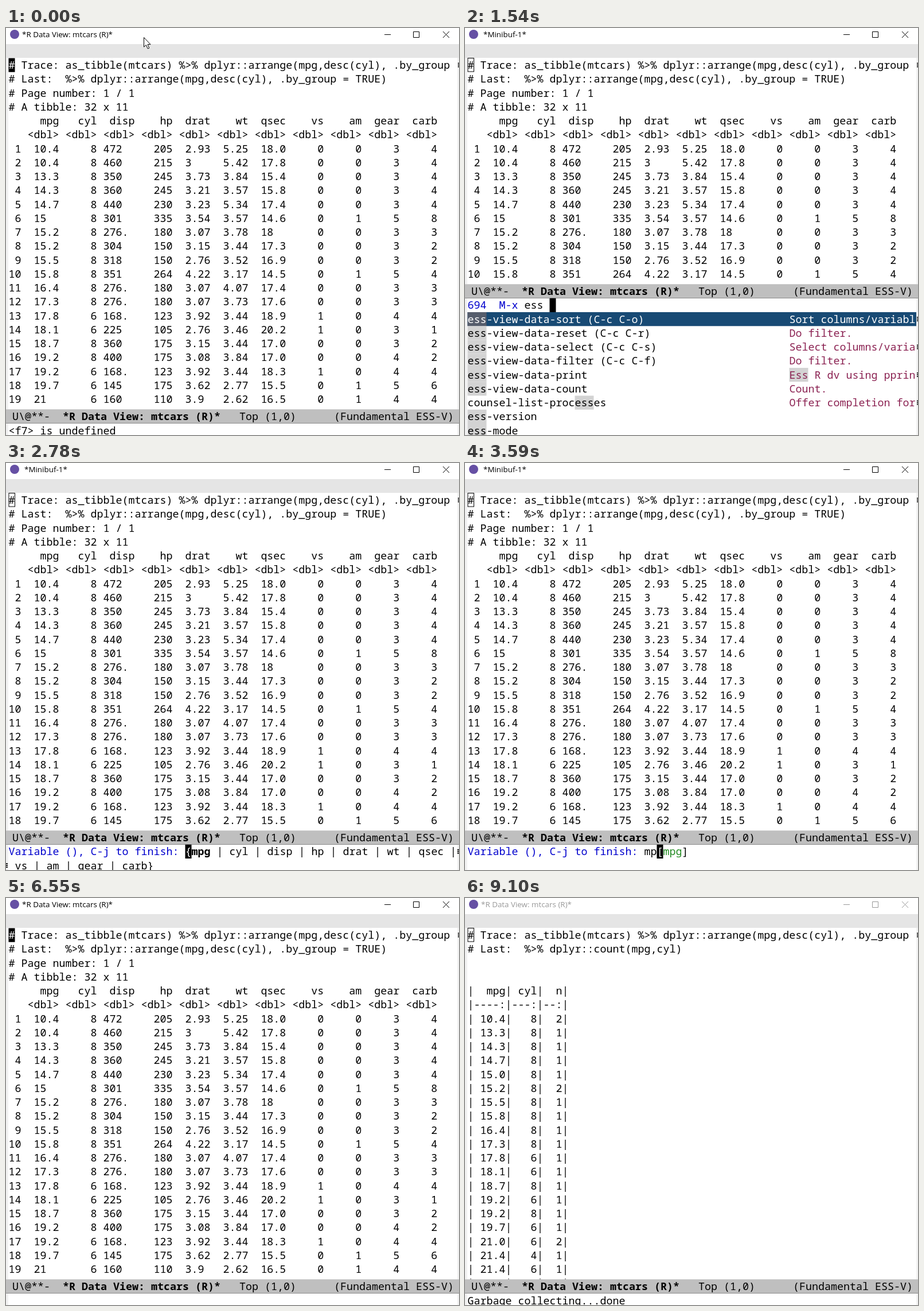
Write an HTML page that moves like this. It is 790 px wide and 709 px high and loops after 9.18 s.

```html
<!DOCTYPE html>
<html lang="en">
<head>
<meta charset="utf-8">
<title>Data view: count</title>
<style>
  html, body { margin: 0; width: 100%; height: 100%; overflow: hidden; background: #fff; }
  svg { display: block; width: 790px; height: 709px; }
  text { white-space: pre; font: 18.333px "Noto Sans Mono", "DejaVu Sans Mono", monospace; }
  text.b { font-weight: 700; }
  text.title { font: 13.4px "Open Sans", "Noto Sans", sans-serif; }
</style>
</head>
<body>
<svg id="stage" viewBox="0 0 790 709"></svg>
<script>
const LOOP = 9180;
const CW = 11, LH = 24.25, X0 = 4.5, COLS = 71;
const TOP = 64.5, BOTTOM = 701;      // centres of the first and last text lines
const BLUE = '#0000cd', GREEN = '#228b22', DOC = '#8b2252', BAR = '#184a74';

const FIELDS = ['mpg', 'cyl', 'disp', 'hp', 'drat', 'wt', 'qsec', 'vs', 'am', 'gear', 'carb'];
const TRACE = '# Trace: as_tibble(mtcars) %>% dplyr::arrange(mpg,desc(cyl), .by_group';

// One column of the table per line; one-digit columns need no spaces
const mpg = '10.4 10.4 13.3 14.3 14.7 15 15.2 15.2 15.5 15.8 16.4 17.3 17.8 18.1 18.7 19.2 19.2 19.7 21'.split(' ');
const disp = '472 460 350 360 440 301 276. 304 318 351 276. 276. 168. 225 360 400 168. 145 160'.split(' ');
const hp = '205 215 245 245 230 335 180 150 150 264 180 180 123 105 175 175 123 175 110'.split(' ');
const drat = '2.93 3 3.73 3.21 3.23 3.54 3.07 3.15 2.76 4.22 3.07 3.07 3.92 2.76 3.15 3.08 3.92 3.62 3.9'.split(' ');
const wt = '5.25 5.42 3.84 3.57 5.34 3.57 3.78 3.44 3.52 3.17 4.07 3.73 3.44 3.46 3.44 3.84 3.44 2.77 2.62'.split(' ');
const qsec = '18.0 17.8 15.4 15.8 17.4 14.6 18 17.3 16.9 14.5 17.4 17.6 18.9 20.2 17.0 17.0 18.3 15.5 16.5'.split(' ');
const cyl = '8'.repeat(12) + '6688666';
const gear = '3333353335334334' + '454';
const carb = '4444483224334122' + '464';
const vs = i => +[12, 13, 16].includes(i);
const am = i => +[5, 9, 17, 18].includes(i);

const heading = names => '  ' + names.map(n => n.padStart(6)).join('');
const tibbleRow = (m, i) => String(i + 1).padStart(2) +
  [m.padEnd(4), cyl[i], disp[i].padEnd(5), hp[i], drat[i].padEnd(4), wt[i], qsec[i].padEnd(4), vs(i), am(i), gear[i], carb[i]]
    .map(v => String(v).padStart(6)).join('');

const TIBBLE = [TRACE,
  '# Last:  %>% dplyr::arrange(mpg,desc(cyl), .by_group = TRUE)',
  '# Page number: 1 / 1', '# A tibble: 32 x 11',
  heading(FIELDS), heading(FIELDS.map(() => '<dbl>')),
  ...mpg.map(tibbleRow)];

// Counts each mpg and cyl pair, including the cars below the visible page
function countLines() {
  const below = ['21.0 6', '21.4 4', '21.4 6', '21.5 4'];
  const tally = {};
  for (const key of [...mpg.map((m, i) => `${(+m).toFixed(1)} ${cyl[i]}`), ...below]) {
    tally[key] = (tally[key] || 0) + 1;
  }
  return Object.keys(tally).sort().map(key => {
    const [m, c] = key.split(' ');
    return `| ${m}|   ${c}|  ${tally[key]}|`;
  });
}

const COUNT = [TRACE, '# Last:  %>% dplyr::count(mpg,cyl)', '', '',
  '|  mpg| cyl|  n|', '|----:|---:|--:|', ...countLines()];

// Completion candidates: name, description, whether it runs past the edge
const SORT = ['ess-view-data-sort (C-c C-o)', 'Sort columns/variabl', true];
const SELECT = ['ess-view-data-select (C-c C-s)', 'Select columns/varia', true];
const VIEW = [SORT,
  ['ess-view-data-reset (C-c C-r)', 'Do filter.'], SELECT,
  ['ess-view-data-filter (C-c C-f)', 'Do filter.'],
  ['ess-view-data-print', 'Ess R dv using pprin', true]];
const THEME = ['disable-theme', 'Disable all variable', true];
const FOX = ['my-app-firefox', 'Firfox'];
const TALLY = ['ess-view-data-count', 'Count.'];
const PROC = ['counsel-list-processes', 'Offer completion for', true];
const LIST_ALL = [...VIEW, ['R', ''], THEME, FOX, ['S', "Call 'Splus6', based", true]];
const LIST_E = [...VIEW, THEME, FOX, TALLY, PROC];
const LIST_ESS = [...VIEW, TALLY, PROC, ['ess-version', ''], ['ess-mode', '']];
const LIST_C = [SELECT, TALLY, PROC, SORT];
const LIST_CO = [TALLY, PROC];

const esc = s => s.replace(/&/g, '&amp;').replace(/</g, '&lt;');
const rect = (x, y, w, h, fill, extra = '') =>
  `<rect x="${x}" y="${y}" width="${w}" height="${h}" fill="${fill}" ${extra}/>`;
const text = (x, mid, s, fill = '#000', cls = '') =>
  `<text x="${x}" y="${mid + 6.5}" fill="${fill}" class="${cls}">${esc(s)}</text>`;
const cell = (col, mid, n, fill) => rect(X0 + col * CW, mid - 12, n * CW, LH, fill);
const at = (col, mid, s, fill, cls) => text(X0 + col * CW, mid, s, fill, cls);
const fromBottom = k => BOTTOM - k * LH;
const edgeMark = (x, mid) => [-4, -1, 2].map(d => rect(x, mid + d, 3, 2, '#222')).join('');

function pointer(x, y) {
  return `<path transform="translate(${x} ${y})" d="M.5 .5V17L4.3 13.5 7.2 20 9.8 19 7 12.6H12Z" fill="#fff" stroke="#000"/>`;
}

function titleBar(s) {
  const ink = s.blur ? '#999' : '#000';
  return rect(0, 0, 790, 28, '#fff') + rect(0, 28, 790, 24, '#e5e5e5') +
    '<circle cx="15" cy="11" r="8" fill="#6650a4"/>' +
    `<text class="title" x="${s.mini ? 32 : 28}" y="16" fill="${ink}">${s.mini ? '*Minibuf-1*' : '*R Data View: mtcars (R)*'}</text>` +
    `<path d="M660 11.5h11M710.5 6.5h10v10h-10zM762 6l11 11M773 6l-11 11" fill="none" stroke="${ink}"/>`;
}

function buffer(s) {
  const lines = s.count ? COUNT : TIBBLE;
  const hollow = s.mini || s.blur;
  let out = hollow ? rect(5, 52.5, 10.5, 23.5, 'none', 'stroke="#000"') : cell(0, TOP, 1, '#000');
  lines.forEach((line, i) => {
    const mid = TOP + i * LH;
    if (i || hollow) out += at(0, mid, line);
    else out += at(0, mid, '#', '#fff') + at(1, mid, line.slice(1));
  });
  return out;
}

function modeLine(k) {
  const mid = fromBottom(k), y = Math.round(mid - 12.5);
  return rect(0, y, 790, 709 - y, '#fff') + rect(0, y, 790, 25, '#bfbfbf') +
    rect(0, y, 790, 1, '#d0d0d0') + rect(0, y + 24, 790, 1, '#8c8c8c') +
    text(0, mid, ' U\\@**-') + text(9 * CW, mid, '*R Data View: mtcars (R)*', '#000', 'b') +
    text(37 * CW, mid, 'Top (1,0)') + text(52 * CW, mid, '(Fundamental ESS-V)');
}

// Lays out coloured runs and wraps them at the window width
function flow(runs, mid) {
  let out = '', col = 0, wraps = '';
  for (let [str, fill, cls] of runs) {
    while (str) {
      if (col === COLS) {
        wraps += edgeMark(787, mid) + edgeMark(0, mid + LH);
        col = 0;
        mid += LH;
      }
      const part = str.slice(0, COLS - col);
      if (fill === 'cursor') out += cell(col, mid, 1, '#000') + at(col, mid, part, '#fff');
      else out += at(col, mid, part, fill, cls);
      col += part.length;
      str = str.slice(part.length);
    }
  }
  return [out, wraps];
}

function marks(str, words, col, mid, fill) {
  let from = 0, out = '';
  for (const w of words) {
    const i = str.toLowerCase().indexOf(w, from);
    if (i < 0) continue;
    out += cell(col + i, mid, w.length, fill);
    from = i + w.length;
  }
  return out;
}

function commandList({ typed, total, list }) {
  const words = typed.split(' ').filter(Boolean);
  let [out, edge] = flow([[String(total).padEnd(5) + 'M-x ', BLUE], [typed], [' ', 'cursor']], fromBottom(9));
  list.forEach(([name, doc, long], i) => {
    const y = fromBottom(8 - i), first = !i;
    if (first) out += rect(X0, y - 12, long ? 782.5 : (51 + doc.length) * CW, LH, BAR);
    const shade = first ? '#565d6c' : '#d3d3d3';
    out += marks(name, words, 0, y, shade) + marks(doc, words, 51, y, shade) +
      at(0, y, name, first ? '#fff' : '#000') + at(51, y, doc, first ? '#fff' : DOC);
    if (long) edge += edgeMark(788, y);
  });
  return [out, edge];
}

function fieldPrompt({ chosen, typed, only }) {
  const runs = [[`Variable (${chosen}), C-j to finish: `, BLUE], [typed]];
  if (only) runs.push(['[', 'cursor'], [only, GREEN], [']']);
  else {
    const taken = chosen.split(',');
    const [head, ...rest] = FIELDS.filter(f => !taken.includes(f) && f.includes(typed))
      .sort((a, b) => b.startsWith(typed) - a.startsWith(typed));
    runs.push(['{', 'cursor'], [head, '#000', 'b'], [rest.map(f => ' | ' + f).join('') + '}']);
  }
  return flow(runs, fromBottom(1));
}

const command = (typed, total, list, mouse) => ({ mini: true, mode: 10, command: { typed, total, list }, mouse });
const field = (chosen, typed = '', only) => ({ mini: true, mode: 2, field: { chosen, typed, only } });

const STEPS = [
  [0, { echo: '<f7> is undefined', mouse: [240, 16] }],
  [840, command('', 7895, LIST_ALL, [240, 16])],
  [990, command('e', 6874, LIST_E)],
  [1240, command('es', 2315, LIST_E)],
  [1390, command('ess', 694, LIST_ESS)],
  [1540, command('ess ', 694, LIST_ESS)],
  [1720, command('ess c', 139, LIST_C)],
  [1830, command('ess co', 36, LIST_CO)],
  [1950, command('ess cou', 2, LIST_CO)],
  [2780, field('')],
  [3410, field('', 'm')],
  [3590, field('', 'mp', 'mpg')],
  [4280, field('mpg')],
  [4740, field('mpg', 'c')],
  [4920, field('mpg', 'cy', 'cyl')],
  [5850, field('mpg,cyl')],
  [6550, {}],
  [6620, { count: true }],
  [8020, { count: true, mouse: [667, -17] }],
  [8090, { count: true }],
  [9100, { count: true, blur: true, echo: 'Garbage collecting...done' }]
];

function draw(s) {
  const [mini, edge] = s.command ? commandList(s.command)
    : s.field ? fieldPrompt(s.field)
    : [at(0, BOTTOM, s.echo || ''), ''];
  const mode = s.mode || 1, y = Math.round(fromBottom(mode) - 12.5);
  const fringe = (top, h) => rect(0, top, 4, h, '#f2f2f2') + rect(787, top, 3, h, '#f2f2f2');
  return rect(0, 0, 790, 709, '#fff') + buffer(s) + titleBar(s) + fringe(52, y - 52) +
    edgeMark(788, TOP) + modeLine(mode) + mini + fringe(y + 25, 684 - y) + edge +
    (s.mouse ? pointer(...s.mouse) : '');
}

const stage = document.getElementById('stage');
let shown;
function render(now) {
  const t = now % LOOP;
  const step = STEPS.findLast(([start]) => start <= t);
  if (step !== shown) {
    shown = step;
    stage.innerHTML = draw(step[1]);
  }
}

const begin = performance.now();
function tick() {
  render(performance.now() - begin);
  requestAnimationFrame(tick);
}
tick();
</script>
</body>
</html>
```
